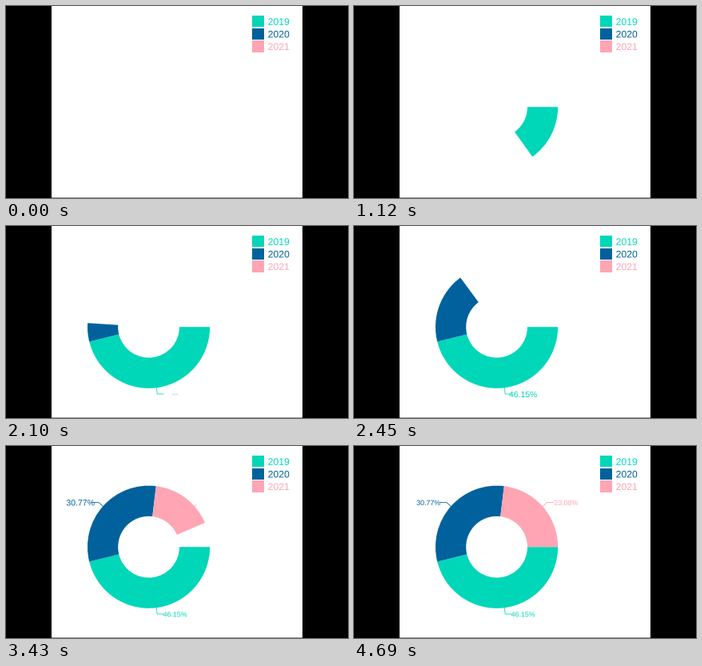
Animation of 428x240 px, one loop 5.25 s. Source, as a matplotlib script:

```python
import numpy as np
import matplotlib.pyplot as plt
from matplotlib.animation import FuncAnimation
from matplotlib.patches import PathPatch, Rectangle, Wedge
from matplotlib.textpath import TextPath
from matplotlib.transforms import Affine2D

W, H, DPI = 428, 240, 64
FRAMES, INTERVAL = 75, 70
PT = 72 / DPI
CENTER, OUTER, INNER = (178.6, 126.2), 76.6, 38.4

# Sweep angle at evenly spaced times, smoothed in between
SWEEP_STEP = 560
SWEEP = np.array([0, 15, 54.3, 122, 204, 279, 332, 357.5, 360, 360])

# Label timing, measured from the moment the sweep passes mid-slice
LEADER_START, LEADER_END = 120, 730
POP_TIMES = [690, 730, 870, 950, 1075, 1280]
POP_SCALES = [0, 0.25, 1.17, 1.28, 1.19, 1]

# year, colour, share, mid-slice time, leader points, label centre
SLICES = [
    ("2019", "#00d6b8", 6 / 13, 1370,
     [(188.3, 202), (189.2, 210), (197, 210)], (211.6, 210.4)),
    ("2020", "#00619c", 4 / 13, 2360,
     [(121.8, 75.8), (116, 70.6), (107.5, 70.6)], (93.2, 70.8)),
    ("2021", "#ffa5b4", 3 / 13, 3190,
     [(235.6, 76), (241.5, 70.6), (250, 70.6)], (265.3, 70.8)),
]

fig = plt.figure(figsize=(W / DPI, H / DPI), dpi=DPI, facecolor="black")
ax = fig.add_axes([0, 0, 1, 1])
ax.set_xlim(0, W)
ax.set_ylim(H, 0)
ax.axis("off")


def add_rect(x, y, w, h, color):
    ax.add_patch(Rectangle((x, y), w, h, fc=color, lw=0))


def text_path(text, size):
    """Outline of the text in pixels, its left edge and middle at the origin."""
    path = TextPath((0, 0), text, size=size, prop={"family": "Liberation Sans"})
    box = path.get_extents()
    flip = Affine2D().translate(-box.x0, -(box.y0 + box.y1) / 2).scale(1, -1)
    return path.transformed(flip), box.width


def sweep_angle(t):
    i = min(int(t // SWEEP_STEP), len(SWEEP) - 2)
    u = t / SWEEP_STEP - i
    slopes = np.gradient(SWEEP)
    slopes[0] = 0
    rise = u * u * (3 - 2 * u)
    angle = (SWEEP[i] * (1 - rise) + SWEEP[i + 1] * rise
             + slopes[i] * u * (1 - u) ** 2 - slopes[i + 1] * u * u * (1 - u))
    return min(angle, 360)


def partial_line(points, fraction):
    points = np.array(points)
    lengths = np.hypot(*np.diff(points, axis=0).T)
    ends = np.concatenate([[0], np.cumsum(lengths)])
    stops = np.minimum(ends, fraction * ends[-1])
    return [np.interp(stops, ends, points[:, k]) for k in (0, 1)]


class Slice:
    def __init__(self, start, color, share, mid_time, points, label_center):
        self.start, self.end = start, start + 360 * share
        self.mid_time, self.points = mid_time, points
        self.label_center = label_center
        self.wedge = ax.add_patch(Wedge(CENTER, OUTER, start, self.end,
                                        width=OUTER - INNER, fc=color, lw=0))
        self.leader, = ax.plot([], [], color=color, lw=0.8 * PT)
        path, width = text_path(f"{100 * share:.2f}%", 8.8)
        self.path = path.transformed(Affine2D().translate(-width / 2, 0))
        self.label = ax.add_patch(PathPatch(self.path, fc=color, lw=0))

    def update(self, t, angle):
        self.wedge.set_visible(angle > self.start)
        self.wedge.set_theta2(max(self.start + 0.01, min(angle, self.end)))

        age = t - self.mid_time
        fraction = (age - LEADER_START) / (LEADER_END - LEADER_START)
        self.leader.set_visible(fraction > 0)
        self.leader.set_data(*partial_line(self.points, np.clip(fraction, 0, 1)))

        scale = np.interp(age, POP_TIMES, POP_SCALES)
        self.label.set_visible(scale > 0)
        place = Affine2D().scale(max(scale, 0.01)).translate(*self.label_center)
        self.label.set_path(self.path.transformed(place))


add_rect(57, 0, 314, 239, "white")
add_rect(57, 239, 314, 1, "#a0a0a0")

slices = []
start = 0
for row, (year, color, share, *label) in enumerate(SLICES):
    y = 19.3 + 15.6 * row
    add_rect(308.4, y - 7.1, 14.2, 14.2, color)
    path, _ = text_path(year, 12.2)
    ax.add_patch(PathPatch(path.transformed(Affine2D().translate(328.3, y + 0.3)),
                           fc=color, lw=0))
    slices.append(Slice(start, color, share, *label))
    start = slices[-1].end


def update(frame):
    t = frame * INTERVAL
    angle = sweep_angle(t)
    for part in slices:
        part.update(t, angle)
    return []


anim = FuncAnimation(fig, update, frames=FRAMES, interval=INTERVAL,
                     repeat=True, repeat_delay=0)
plt.show()
```
